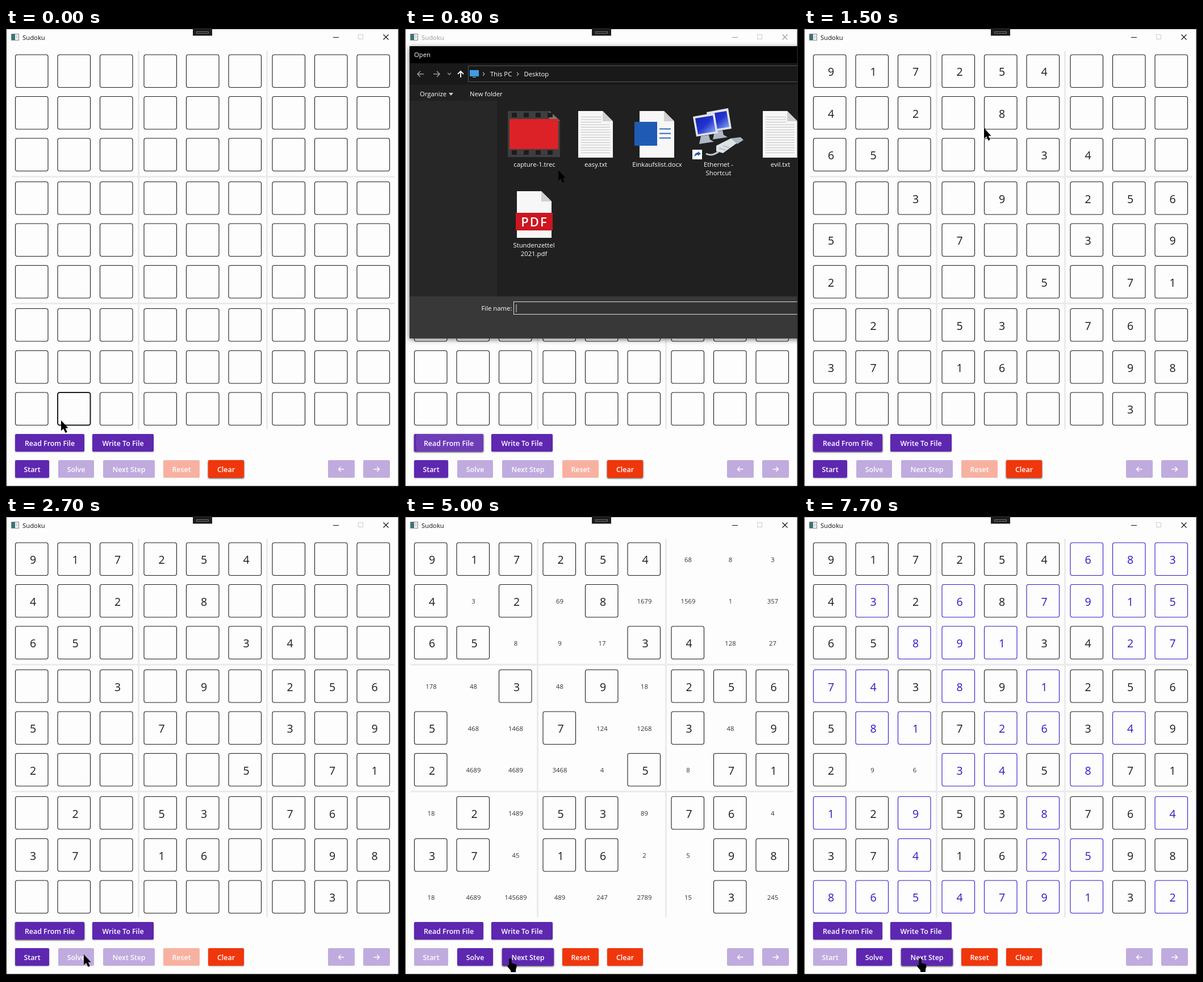
Recreate the animation shown at these times as an HTML page. Size 692 by 809 pixels, loop 8 s.

```html
<!DOCTYPE html>
<html lang="en">
<head>
<meta charset="utf-8">
<title>Sudoku</title>
<style>
  html, body { margin: 0; width: 100%; height: 100%; overflow: hidden; background: #fdfdfd; }
  svg { display: block; }
  text { font-family: "Open Sans", "Noto Sans", sans-serif; font-size: 11.3px; }
  .mid { text-anchor: middle; }
  .btn { filter: drop-shadow(0 1px 1px #0005); }
  .btn.up { filter: drop-shadow(0 1px 1.5px #000c); }
  .btn.off { opacity: .38; filter: none; }
  .btn text { font-size: 12.4px; font-weight: 600; fill: #fff; text-anchor: middle; }
  .big { font-size: 19.5px; }
  .line { fill: none; }
</style>
</head>
<body>
<svg id="stage" width="692" height="809" viewBox="0 0 692 809"></svg>
<script>
const LOOP = 8000, STEP = 100;
const START = 4100, STEP1 = 5600, STEP2 = 6400, LOADED = 1500;
const BLUE = '#3517c4', PURPLE = '#5e27b0', RED = '#f0370c';

const SOLUTION = '917254683432687915658913427743891256581726349296345871129538764374162598865479132';
// 0 = given, 1 and 2 = solving step, 3 = still open
const SOLVED_AT = '000000211010202212001120011220202000022022010033210100202002001002001100222212101';
const COLS = [16.5, 91, 165.5, 243, 317.5, 392, 469, 543.5, 618];
const ROWS = [47, 120.5, 194, 270.5, 344, 417.5, 493.5, 567.5, 641];
const SIZE = 57.5;

const BUTTONS = [
  { id: 'read', x: 16, y: 714, w: 122, label: 'Read From File' },
  { id: 'write', x: 152, y: 714, w: 108, label: 'Write To File' },
  { id: 'start', x: 16, y: 760, w: 60, label: 'Start' },
  { id: 'solve', x: 92, y: 760, w: 63, label: 'Solve' },
  { id: 'next', x: 171, y: 760, w: 91, label: 'Next Step' },
  { id: 'reset', x: 277, y: 760, w: 64, label: 'Reset', fill: RED },
  { id: 'clear', x: 356, y: 760, w: 63, label: 'Clear', fill: RED },
  { id: 'back', x: 567, y: 760, w: 47, icon: 'M28.500 16h-10m4-4l-4 4 4 4' },
  { id: 'forth', x: 629, y: 760, w: 47, icon: 'M18.500 16h10m-4-4l4 4-4 4' }
];
const CLICKS = [[300, 'read'], [4000, 'start'], [5500, 'next'], [6300, 'next']];

// time, x, y of the pointer tip
const PATH = [
  [0, 97, 690], [100, 100, 711], [200, 104, 728], [400, 104, 728], [500, 160, 560],
  [600, 221, 377], [800, 270, 250], [1000, 317, 176], [1500, 317, 176],
  [1800, 276, 273], [2100, 240, 480], [2500, 137, 771], [2700, 137, 771],
  [3300, 55, 779], [4300, 55, 779], [5100, 206, 778], [LOOP, 206, 778]
];

const rect = (x, y, w, h, fill, more = '') =>
  `<rect x="${x}" y="${y}" width="${w}" height="${h}" fill="${fill}" ${more}/>`;
const path = (d, fill, more = '') => `<path d="${d}" fill="${fill}" ${more}/>`;
const line = (d, color, width = 1) => path(d, 'none', `stroke="${color}" stroke-width="${width}"`);
const text = (x, y, s, fill = '#fff', cls = '') => `<text x="${x}" y="${y}" fill="${fill}" class="${cls}">${s}</text>`;
const label = (x, y, s) => text(x, y, s, '#fff', 'mid');

function windowFrame() {
  const rules = [233.5, 459.5].map(x => line(`M${x} 40V706`, '#ebebeb', 3)).join('') +
    [261.5, 484.5].map(y => line(`M10 ${y}H684`, '#ebebeb', 3)).join('');
  return rect(0, 0, 692, 809, '#fdfdfd') + rules +
    rect(9.5, 10.5, 13, 11, '#f4f4f4', 'stroke="#888"') + rect(10, 11, 6, 10, '#36747c') +
    line('M17 14h4M17 17h4', '#aaa') +
    `<g id="caption">${text(29, 20.500, 'Sudoku', 'currentColor')}
      ${line('M576 16.500h10M664.500 11.500l9 9M673.500 11.500l-9 9', 'currentColor', 1.2)}</g>` +
    line('M620.500 11.500h8v8h-8z', '#ccc');
}

function edges() {
  return rect(0, 0, 692, 2, '#000') + rect(0, 0, 1, 809, '#222') + rect(690.5, 0, 1.5, 809, '#222') +
    rect(0, 805.5, 692, 3.5, '#000') + rect(329, 0, 34, 13.5, '#1c1c1c') +
    line('M335.500 6.500h21v3h-21z', '#777');
}

function buttonMarkup(b) {
  const mark = b.icon ? line(b.icon, '#fff', 1.6) : `<text x="${b.w / 2}" y="21">${b.label}</text>`;
  return `<g class="btn" id="${b.id}"><svg x="${b.x}" y="${b.y}" width="${b.w}" height="31">
    ${rect(0, 0, b.w, 31, b.fill || PURPLE, 'rx="2"')}<circle r="0" fill="#fff"/>${mark}</svg></g>`;
}

function sheet(x, y, ruled) {
  let s = path(`M${x} ${y}h43l18 18v64h-61z`, '#f7f7f7') + path(`M${x + 43} ${y}v18h18z`, '#cfcfcf');
  if (ruled) for (let i = 0; i < 15; i++) s += line(`M${x + 5} ${y + 10.5 + i * 4.5}h${i < 3 ? 36 : 51}`, '#bcbcbc', .9);
  return s;
}

function film() {
  let s = path('M181 146h74l18 17v64h-92z', '#3e3e3e') + path('M254 146v17h19z', '#777');
  for (let i = 0; i < 4; i++)
    for (const y of [149, 215]) s += rect(188 + i * 21, y, 9, 8, '#1c1c1c', 'rx="1"');
  return s + rect(184, 160, 86, 53, '#dc2226');
}

function network() {
  const screen = (x, y) => path(`M${x} ${y}l38-7 6 36-38 6z`, '#dfe3ea') +
    path(`M${x + 4} ${y + 3}l31-5 5 28-31 5z`, 'url(#screen)') +
    path(`M${x + 14} ${y + 34}l14-2 2 8 7 4-26 4z`, '#aeb8c6');
  return screen(531, 148) + screen(507, 156) +
    line('M530 221c10 5 16 0 22-3', '#bfc8d0', 3) +
    path('M548 207l26-13 11 8-25 18-12-3z', '#dce3e8') + path('M574 194l17-2 5 5-11 7z', '#aab5bd') +
    line('M553 211l12 4M560 207l12 4', '#929da6') +
    rect(506, 214, 17, 17, '#fff') + path('M510 227c-1-6 3-8 6-8v-2l5 4-5 4v-2c-3 0-5 1-6 4z', '#245fa8');
}

function dialog() {
  const chevron = (x, y) => line(`M${x} ${y}l3 3-3 3`, '#aaa', 1.2);
  return rect(8, 32, 1004, 514, '#202020', 'style="filter:drop-shadow(0 2px 5px #0008)"') +
    rect(8, 32, 1004, 30, '#000') + rect(8, 62, 1004, 38, '#191919') +
    rect(8, 472, 1004, 74, '#383838') +
    text(16, 51, 'Open') +
    line('M33 81H22m5-5l-5 5 5 5M50 81h11m-5-5l5 5-5 5', '#999', 1.5) + line('M75 79l3 3 3-3', '#999', 1.3) +
    line('M98 87V76m-5 5l5-5 5 5', '#fff', 1.8) +
    rect(111.5, 66.5, 900, 28, '#191919', 'stroke="#555"') +
    rect(114, 74, 16, 11, '#3f9be8') + rect(119, 86, 6, 1, '#9cc') +
    chevron(137, 78) + text(150, 84.5, 'This PC') + chevron(197, 78) + text(209.5, 84.5, 'Desktop') +
    text(26, 120, 'Organize') + path('M77 114h8l-4 5z', '#ccc') + text(114, 120, 'New folder') +
    `<rect id="pick" x="286.500" y="138.500" width="99" height="110"/>` +
    film() + label(228, 244, 'capture-1.trec') +
    sheet(305, 146, true) + label(336, 244, 'easy.txt') +
    sheet(413, 146) + rect(404, 165, 40, 42, '#1f5bb5') +
    line('M448 177.500h20M448 185.500h20M448 193.500h20', '#2f68b8', 2) + label(444, 244, 'Einkaufslist.docx') +
    network() + label(552, 244, 'Ethernet -') + label(552, 258.5, 'Shortcut') +
    sheet(630, 146, true) + label(661, 244, 'evil.txt') +
    sheet(197, 287) + rect(195, 325, 65, 31, '#cc1620') +
    '<text x="228" y="348.500" fill="#fff" class="mid" style="font-size:22px;font-weight:600;letter-spacing:2px">PDF</text>' +
    label(227, 386, 'Stundenzettel') + label(227, 401, '2021.pdf') +
    text(134.5, 496.5, 'File name:') + rect(191.5, 481.5, 820, 22, '#333', 'stroke="#ddd"') +
    `<text id="file" x="195" y="497" fill="#fff"></text>` + line('M196 486v14', '#ddd');
}

let cellMarkup = '';
for (let i = 0; i < 81; i++) {
  const x = COLS[i % 9], y = ROWS[i / 9 | 0];
  cellMarkup += `<g class="cell"><rect x="${x}" y="${y}" width="${SIZE}" height="${SIZE}" rx="3.500" fill="none"/>` +
    `<text x="${x + 31}" y="${y + 37}" class="mid big"></text>` +
    `<text x="${x + 29.5}" y="${y + 33.5}" class="mid" fill="#333"></text></g>`;
}

const $ = id => document.getElementById(id);
$('stage').innerHTML =
  `<defs><linearGradient id="screen" x2="1" y2="1"><stop stop-color="#1420a8"/><stop offset=".5" stop-color="#2434d0"/>
    <stop offset="1" stop-color="#8fb4f4"/></linearGradient></defs>` +
  windowFrame() + cellMarkup + BUTTONS.map(buttonMarkup).join('') +
  `<g id="dialog">${dialog()}</g>` + rect(8, 128, 154, 344, '#272727', 'id="side"') + edges() +
  `<path id="arrow" d="M0 0V18.500l4.300-3.800 3.200 7.300 3.300-1.500-3.200-6.800h5z"/>
   <path id="hand" d="M-4 2c0-3 4.500-3 4.500 0v6l6 1.500c3 .8 3.300 2 3 5l-1.500 5v4.500h-9v-3l-5-6c-2-3 0-4.500 2-2.500z"/>`;
const cells = [...document.querySelectorAll('.cell')];

function pointerAt(t) {
  const k = PATH.findIndex((p, i) => i && t <= p[0]);
  const [t0, x0, y0] = PATH[k - 1], [t1, x1, y1] = PATH[k];
  const u = (t - t0) / (t1 - t0);
  return [x0 + (x1 - x0) * u, y0 + (y1 - y0) * u];
}

const inside = (px, py, x, y, w, h) => px >= x && px < x + w && py >= y && py < y + h;

function candidates(i, board) {
  const r = i / 9 | 0, c = i % 9, used = new Set();
  board.forEach((d, j) => {
    const r2 = j / 9 | 0, c2 = j % 9;
    if (r === r2 || c === c2 || ((r / 3 | 0) === (r2 / 3 | 0) && (c / 3 | 0) === (c2 / 3 | 0))) used.add(d);
  });
  return [...'123456789'].filter(d => !used.has(d)).join('');
}

function drawGrid(t, px, py, blocked) {
  const stage = t < LOADED ? -1 : t < STEP1 ? 0 : t < STEP2 ? 1 : 2;
  const solving = t >= START;
  const board = [...SOLUTION].map((d, i) => +SOLVED_AT[i] <= stage ? d : '');
  cells.forEach((cell, i) => {
    const [box, digit, notes] = cell.children;
    const color = SOLVED_AT[i] > 0 && solving ? BLUE : '#1c1c1c';
    const hot = !blocked && inside(px, py, COLS[i % 9], ROWS[i / 9 | 0], SIZE, SIZE);
    box.setAttribute('stroke', solving && !board[i] ? 'none' : color);
    box.setAttribute('stroke-width', hot ? 2 : 1.1);
    digit.setAttribute('fill', color);
    digit.textContent = board[i];
    notes.textContent = solving && !board[i] ? candidates(i, board) : '';
  });
}

function drawButtons(t, px, py, blocked) {
  const solving = t >= START;
  const focus = t < 400 ? 'clear' : t < START ? 'read' : t < STEP1 ? '' : 'next';
  let over = false;
  for (const b of BUTTONS) {
    const el = $(b.id), ripple = el.querySelector('circle');
    const on = b.id === 'start' ? !solving : /solve|next|reset/.test(b.id) ? solving : !b.icon;
    const hot = on && !blocked && inside(px, py, b.x, b.y, b.w, 31);
    const up = hot || focus === b.id || (b.id === 'clear' && t < 1900);
    el.setAttribute('class', 'btn' + (on ? up ? ' up' : '' : ' off'));
    over = over || hot;

    const click = CLICKS.find(([c, id]) => id === b.id && t >= c && t < c + 600);
    const age = click ? t - click[0] : 0;
    const [cx, cy] = click ? pointerAt(click[0]) : [0, 0];
    ripple.setAttribute('cx', cx - b.x);
    ripple.setAttribute('cy', cy - b.y);
    ripple.setAttribute('r', 85 * Math.min(1, age / 300));
    ripple.setAttribute('opacity', .3 * Math.min(1, 2 - age / 300));
  }
  return over;
}

function drawDialog(t) {
  const open = t >= 600 && t < LOADED;
  const alpha = !open ? 0 : t < 700 ? .71 : t < 1400 ? 1 : .4;
  const scale = alpha < 1 ? .984 : 1;
  const el = $('dialog');
  el.setAttribute('opacity', alpha);
  el.setAttribute('transform', `translate(510 289) scale(${scale}) translate(-510 -289)`);
  el.setAttribute('visibility', open ? 'visible' : 'hidden');
  $('side').setAttribute('visibility', open && t < 1400 ? 'visible' : 'hidden');
  $('file').textContent = t >= 1100 ? 'easy.txt' : '';
  $('pick').setAttribute('fill', t >= 1100 ? '#777' : t >= 900 ? '#4d4d4d' : 'none');
  $('pick').setAttribute('stroke', t >= 1100 ? '#8c8c8c' : 'none');
  $('caption').setAttribute('color', open && t < 1400 ? '#999' : '#111');
  return open;
}

function render(t) {
  const [x, y] = pointerAt(t);
  const blocked = drawDialog(t);
  drawGrid(t, x, y, blocked);
  const hand = drawButtons(t, x, y, blocked);
  for (const id of ['arrow', 'hand']) {
    $(id).setAttribute('transform', `translate(${x} ${y})`);
    $(id).setAttribute('visibility', (id === 'hand') === hand ? 'visible' : 'hidden');
  }
}

const t0 = performance.now();
let shown = -1;
function tick() {
  const t = Math.floor(((performance.now() - t0 + 10) % LOOP) / STEP) * STEP;
  if (t !== shown) render(shown = t);
  requestAnimationFrame(tick);
}
tick();
</script>
</body>
</html>
```
